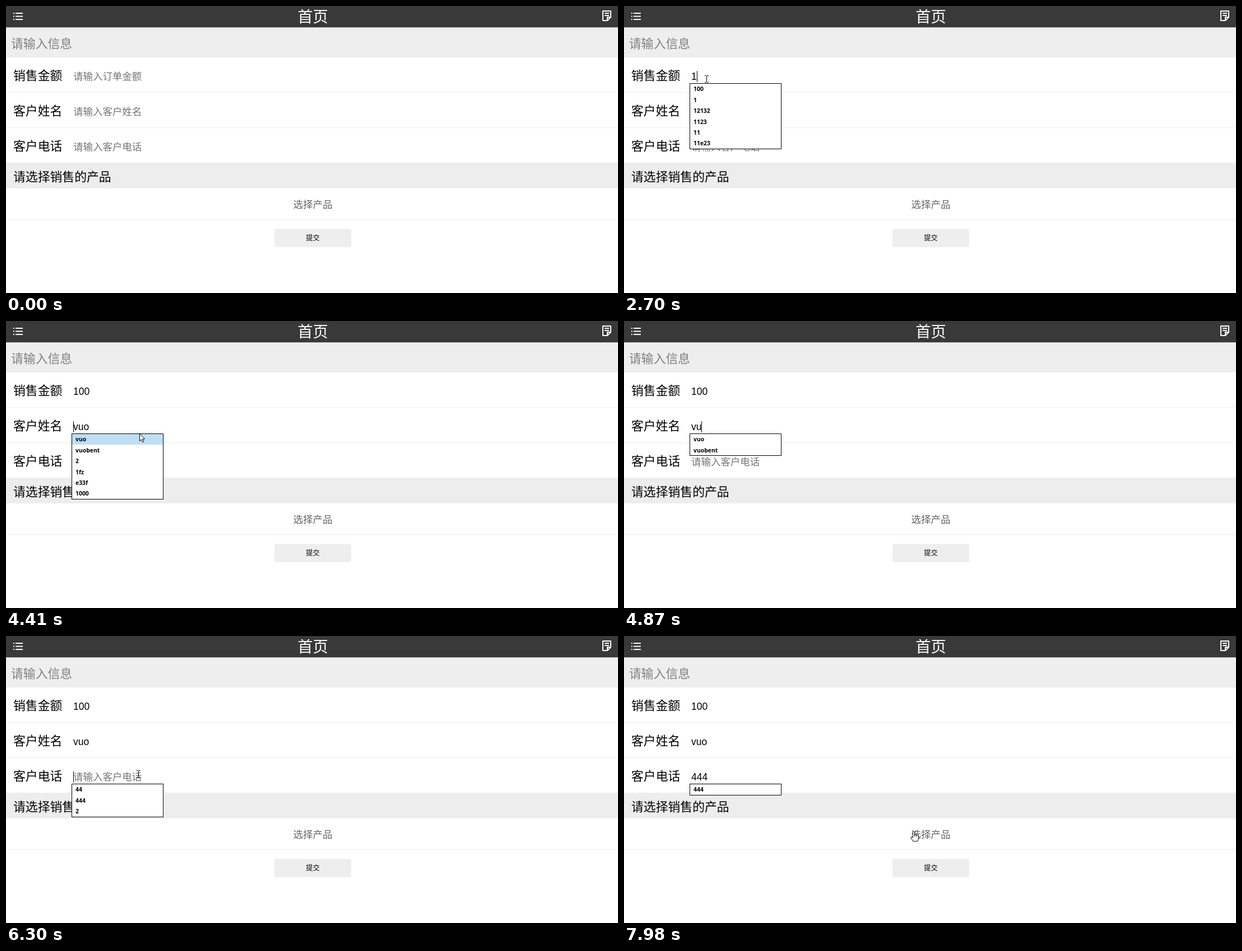
These frames come from a looping animation (1092 by 513 pixels, 8000 ms). An HTML page with a canvas:

```html
<!DOCTYPE html>
<html lang="zh-CN">
<head>
<meta charset="utf-8">
<title>首页</title>
<style>
html, body { margin: 0; width: 100%; height: 100%; overflow: hidden; background: #fff; }
canvas { display: block; }
</style>
</head>
<body>
<canvas id="stage" width="1092" height="513"></canvas>
<script>
const ctx = document.getElementById('stage').getContext('2d');
const W = 1092, H = 513, LOOP = 8000;
const CJK = '"Noto Sans CJK SC", "Noto Sans CJK", sans-serif';
const LATIN = '"Liberation Sans", Arial, sans-serif';
const MENU = '"Noto Sans", "Open Sans", sans-serif';
const BIG = W * 0.02, SMALL = W * 0.016;
const FIELD_X = 120, ROW_Y = 125.5, ROW_H = 63;
const LIST_X = 117, LIST_W = 164, LIST_Y = 138, ITEM_H = 19.4;
const BLINK = 550, MOVE_STEP = 77;

// focus, open: when the field is clicked and its list opens; keys: time of each key.
const fields = [
  { label: '销售金额', hint: '请输入订单金额', value: '100',
    focus: 2290, open: 2480, keys: [2700, 3080, 3250],
    history: ['100', '1', '12132', '1123', '11', '11e23'] },
  { label: '客户姓名', hint: '请输入客户姓名', value: 'vuo',
    focus: 4090, open: 4170, keys: [4650, 4870, 4950],
    history: ['vuo', 'vuobent', '2', '1fz', 'e33f', '1000'] },
  { label: '客户电话', hint: '请输入客户电话', value: '444',
    focus: 6030, open: 6240, keys: [6750, 6900, 7200],
    history: ['44', '444', '2'] }
];

// Pointer legs: start, end, and the point reached from the previous one.
const origin = [1036, 527];
const legs = [
  [70, 340, 570, 93], [408, 610, 431, 148],
  [1550, 1550, 422, 139], [1620, 1710, 381, 122], [1850, 2100, 193, 130],
  [2700, 2700, 147, 130],
  [3710, 3710, 180, 162], [3800, 3940, 236, 196],
  [4330, 4330, 238, 201], [5500, 5810, 236, 246],
  [6900, 7130, 352, 259], [7207, 7670, 515, 315], [7820, 7980, 517, 349]
];

function text(str, x, cy, size, family, color, align = 'left', weight = 400) {
  ctx.font = `${weight} ${size}px ${family}`;
  ctx.fillStyle = color;
  ctx.textAlign = align;
  const lift = family === CJK ? 0.38 : 0.358;
  ctx.fillText(str, x, cy + size * lift);
}

function box(x, y, w, h, color) {
  ctx.fillStyle = color;
  ctx.fillRect(x, y, w, h);
}

function path(points) {
  ctx.beginPath();
  points.forEach(([x, y]) => ctx.lineTo(x, y));
}

function outline(points) {
  path(points);
  ctx.closePath();
  ctx.fill();
  ctx.stroke();
}

const typed = (field, t) => field.value.slice(0, field.keys.filter(k => t >= k).length);

function pointerAt(t) {
  const i = legs.filter(leg => t >= leg[0]).length - 1;
  if (i < 0) return null;
  const [start, end, x, y] = legs[i];
  // Typing hides the pointer until it moves again.
  if (fields.some(f => f.keys.some(k => k <= t && k > Math.max(start, end)))) return null;
  const [px, py] = i ? legs[i - 1].slice(2) : origin;
  const last = Math.round((end - start) / MOVE_STEP);
  const step = last ? Math.min(last, Math.floor((t - start) / (end - start) * last + 1e-6)) : 0;
  const u = (step + 1) / (last + 1);
  return { x: Math.round(px + (x - px) * u), y: Math.round(py + (y - py) * u) };
}

function formState(t) {
  const active = fields.filter(f => t >= f.focus).length - 1;
  const values = fields.map(f => typed(f, t));
  const pointer = pointerAt(t);
  const state = { active, values, pointer, list: [], hot: -1, caret: false, preview: '' };
  if (active < 0) return state;

  const field = fields[active];
  const lastInput = Math.max(field.focus, ...field.keys.filter(k => t >= k));
  state.caret = Math.floor((t - lastInput) / BLINK) % 2 === 0;
  if (t >= field.open) state.list = field.history.filter(s => s.startsWith(values[active]));
  state.listY = LIST_Y + active * ROW_H;
  if (pointer && pointer.x > LIST_X && pointer.x < LIST_X + LIST_W) {
    const row = Math.floor((pointer.y - state.listY) / ITEM_H);
    if (row >= 0 && row < state.list.length) state.hot = row;
  }
  if (!values[active] && state.hot >= 0) state.preview = state.list[state.hot];
  return state;
}

function drawHeader() {
  box(0, 39, W, 53, '#eee');
  box(0, 38, W, 1, '#eee');
  box(0, 0, W, W * 0.035, '#393939');
  text('首页', 547.5, 19, W * 0.025, CJK, '#fff', 'center');
  for (let y = 12; y < 25; y += 5.5) {
    box(13, y, 2, 2, '#fff');
    box(17, y, 13, 2, '#fff');
  }
  ctx.strokeStyle = '#fff';
  ctx.lineWidth = 2;
  ctx.lineJoin = 'round';
  path([[1073, 26], [1065, 26], [1065, 9], [1079, 9], [1079, 20], [1073, 26], [1073, 20], [1079, 20]]);
  ctx.stroke();
  box(1068, 12, 8, 2, '#fff');
  box(1068, 16, 8, 2, '#fff');
}

function drawForm(s) {
  text('请输入信息', 9, 67, BIG, CJK, '#808080');
  fields.forEach((field, i) => {
    const y = ROW_Y + i * ROW_H;
    const value = s.values[i] || (i === s.active ? s.preview : '');
    text(field.label, 13, y - 1.5, BIG, CJK, '#000');
    if (value) text(value, FIELD_X, y, SMALL, LATIN, '#000');
    else text(field.hint, FIELD_X, y, SMALL, CJK, '#757575');
    box(0, 154 + i * ROW_H, W, 1, '#eee');
  });
  box(0, 280, W, 46, '#ededed');
  text('请选择销售的产品', 13, 305, BIG, CJK, '#000');
  text('选择产品', 547.5, 354.5, SMALL, CJK, '#666', 'center');
  box(0, 381.5, W, 1, '#eaeaea');
  ctx.fillStyle = '#eee';
  ctx.beginPath();
  ctx.roundRect(479, 398.5, 137, 32.5, 3);
  ctx.fill();
  text('提交', 547.5, 414.5, 12.2, CJK, '#000', 'center');
}

function drawCaret(s) {
  if (!s.caret) return;
  ctx.font = `400 ${SMALL}px ${LATIN}`;
  const w = ctx.measureText(s.values[s.active]).width;
  box(Math.round(FIELD_X + w), 116 + s.active * ROW_H, 1, 20, '#000');
}

function drawList(s) {
  if (!s.list.length) return;
  const h = Math.ceil(s.list.length * ITEM_H + 1);
  box(LIST_X, s.listY, LIST_W, h, '#000');
  box(LIST_X + 1, s.listY + 1, LIST_W - 2, h - 2, '#fff');
  if (s.hot >= 0) {
    box(LIST_X + 1, s.listY + 1 + Math.round(s.hot * ITEM_H), LIST_W - 2, 19, '#bfdef6');
  }
  s.list.forEach((item, i) =>
    text(item, 124, s.listY + 10.7 + i * ITEM_H, 10.4, MENU, '#000', 'left', 700));
}

const pointers = {
  arrow() {
    outline([[0.5, 0.5], [0.5, 13.5], [3.5, 10.8], [5.8, 15.7], [7.8, 14.8], [5.6, 10], [9.5, 9.7]]);
  },
  beam() {
    box(0, -5, 1, 11, '#000');
    for (const y of [-6, 6]) {
      box(-3, y, 3, 1, '#000');
      box(1, y, 3, 1, '#000');
    }
  },
  hand() {
    outline([[-1.5, 1], [0, 0], [1.5, 1], [1.5, 6], [4, 6], [4.5, 7], [7, 7], [8.5, 9],
      [8.5, 13], [6.5, 18], [-1, 18], [-5, 12], [-4.5, 10], [-3, 10], [-1.5, 11.5]]);
    for (const x of [1.5, 4.5]) {
      path([[x, 6], [x, 9.5]]);
      ctx.stroke();
    }
  }
};

function pointerKind({ x, y }, hot) {
  if (hot >= 0) return 'arrow';
  if (y > 326 && y < 382) return 'hand';
  const overInput = fields.some((f, i) => Math.abs(y - ROW_Y - i * ROW_H) < 18);
  return overInput && x > LIST_X && x < 300 ? 'beam' : 'arrow';
}

function drawPointer(s) {
  if (!s.pointer) return;
  ctx.save();
  ctx.translate(s.pointer.x, s.pointer.y);
  ctx.fillStyle = '#fff';
  ctx.strokeStyle = '#000';
  ctx.lineWidth = 1;
  ctx.lineJoin = 'miter';
  pointers[pointerKind(s.pointer, s.hot)]();
  ctx.restore();
}

function draw(t) {
  const state = formState(t);
  box(0, 0, W, H, '#fff');
  drawHeader();
  drawForm(state);
  drawCaret(state);
  drawList(state);
  drawPointer(state);
}

const begin = performance.now();
function tick() {
  draw((performance.now() - begin) % LOOP);
  requestAnimationFrame(tick);
}
tick();
</script>
</body>
</html>
```
